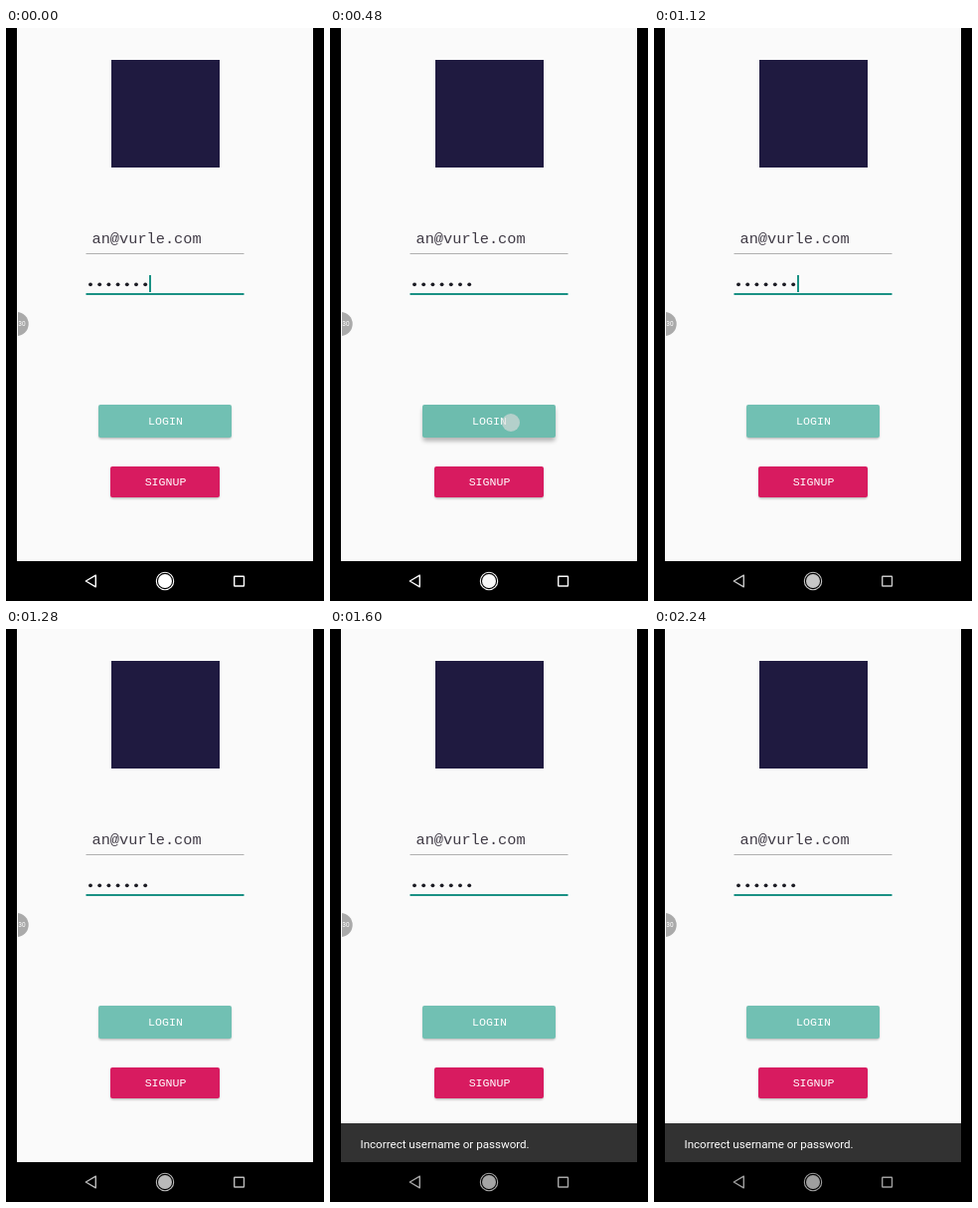
An HTML page that plays this animation: 320x575 px, repeating every 2880 ms.

```html
<!DOCTYPE html>
<html lang="en">
<head>
<meta charset="utf-8">
<title>Login screen</title>
<style>
  html, body { margin: 0; width: 100%; height: 100%; overflow: hidden; background: #000; }
  svg { display: block; width: 320px; height: 575px; }
  .mono { font-family: "Liberation Mono", "Courier New", monospace; }
  .button { font-size: 11.6px; fill: #fff; text-anchor: middle; }
  .toast { font: 11.6px Roboto, sans-serif; fill: #fff; }
</style>
</head>
<body>
<svg viewBox="0 0 320 575">
  <defs>
    <clipPath id="screen"><rect x="11" width="298" height="535"/></clipPath>
    <filter id="blur" x="-10%" y="-50%" width="120%" height="200%">
      <feGaussianBlur id="spread" stdDeviation="1"/>
    </filter>
    <filter id="soft" x="-10%" y="-40%" width="120%" height="180%"><feGaussianBlur stdDeviation="1"/></filter>
  </defs>
  <rect width="320" height="575"/>
  <g clip-path="url(#screen)">
    <rect x="11" width="298" height="535" fill="#fafafa"/>
    <rect x="106" y="32" width="109" height="108" fill="#1f1a40"/>

    <text class="mono" x="86.5" y="216" font-size="15.3" fill="#403b46">an@vurle.com</text>
    <rect x="80.5" y="226" width="159" height="1" fill="#b0b0b0"/>
    <g id="dots" fill="#1c1c24"></g>
    <rect x="80.5" y="266" width="159" height="2" fill="#1b9184"/>
    <rect id="cursor" x="144" y="248" width="2" height="17" fill="#1b9184"/>

    <path d="M12 285 A12 12 0 0 1 12 309 Z" transform="translate(-1.3 0)" fill="#aaa"/>
    <rect x="11" y="285" width="1" height="24" fill="#fafafa"/>
    <text x="12.3" y="299.3" font-size="6.5" font-family="Roboto, sans-serif" fill="#fff">30</text>

    <rect id="shadow" x="93.5" width="133" height="33" rx="2" filter="url(#blur)"/>
    <rect id="login" x="93" y="378" width="134" height="33" rx="2"/>
    <text class="mono button" x="160.5" y="398">LOGIN</text>
    <rect x="105.5" y="441.2" width="109" height="31" rx="2" opacity=".28" filter="url(#soft)"/>
    <rect x="105" y="440" width="110" height="31" rx="2" fill="#d81b60"/>
    <text class="mono button" x="160.5" y="459">SIGNUP</text>
    <circle id="touch" cx="182" cy="396" r="9" fill="#dadada"/>

    <g id="bar">
      <rect x="11" y="496" width="298" height="39" fill="#323232"/>
      <text id="message" class="toast" x="30.5" y="520.5">Incorrect username or password.</text>
    </g>
  </g>
  <g id="nav" fill="none" stroke-width="1.4" stroke-linejoin="round">
    <path d="M80.3 555 L90.3 549.2 V560.8 Z"/>
    <circle cx="160" cy="555" r="8.7" stroke-width="1.1"/>
    <circle id="home" cx="160" cy="555" r="7" stroke="none"/>
    <rect x="229.7" y="550.2" width="9.8" height="9.8" rx=".6"/>
  </g>
</svg>
<script>
  const LOOP = 2880;
  const $ = id => document.getElementById(id);
  const set = (id, attrs) => {
    for (const key in attrs) $(id).setAttribute(key, attrs[key]);
  };

  // Each track lists [start time, value]; values hold until the next step.
  const tracks = {
    cursor: [[0, 1], [320, 0], [800, 1], [1280, 0], [1760, 1], [2240, 0]],
    touch: [[0, 0], [320, .65], [640, 0]],
    lift: [[0, 0], [480, 1], [640, .5], [800, 0]],
    login: [[0, "#71c0b3"], [480, "#6dbcae"], [960, "#71c0b3"]],
    bar: [[0, 40], [1440, 7.5], [1600, 0]],
    message: [[0, 0], [1440, .3], [1600, 1]],
    nav: [[0, 255], [480, 248], [640, 236], [800, 222], [960, 210],
          [1120, 198], [1280, 186], [1440, 174], [1600, 166], [2240, 158]]
  };
  const at = (name, time) => tracks[name].filter(step => step[0] <= time).pop()[1];

  for (let i = 0; i < 7; i++) {
    const dot = document.createElementNS("http://www.w3.org/2000/svg", "circle");
    dot.setAttribute("cx", 85 + 9.2 * i);
    dot.setAttribute("cy", 257.3);
    dot.setAttribute("r", 1.9);
    $("dots").append(dot);
  }

  function draw(time) {
    const lift = at("lift", time);
    const level = at("nav", time);
    const tone = `rgb(${level},${level},${level})`;
    set("cursor", { opacity: at("cursor", time) });
    set("touch", { opacity: at("touch", time) });
    set("login", { fill: at("login", time) });
    set("shadow", { y: 379.2 + 2.3 * lift, opacity: .28 });
    set("spread", { stdDeviation: 1 + 1.2 * lift });
    set("bar", { transform: `translate(0 ${at("bar", time)})` });
    set("message", { opacity: at("message", time) });
    set("nav", { stroke: tone });
    set("home", { fill: tone });
  }

  const start = performance.now();
  function tick() {
    draw((performance.now() - start) % LOOP);
    requestAnimationFrame(tick);
  }
  tick();
</script>
</body>
</html>
```
